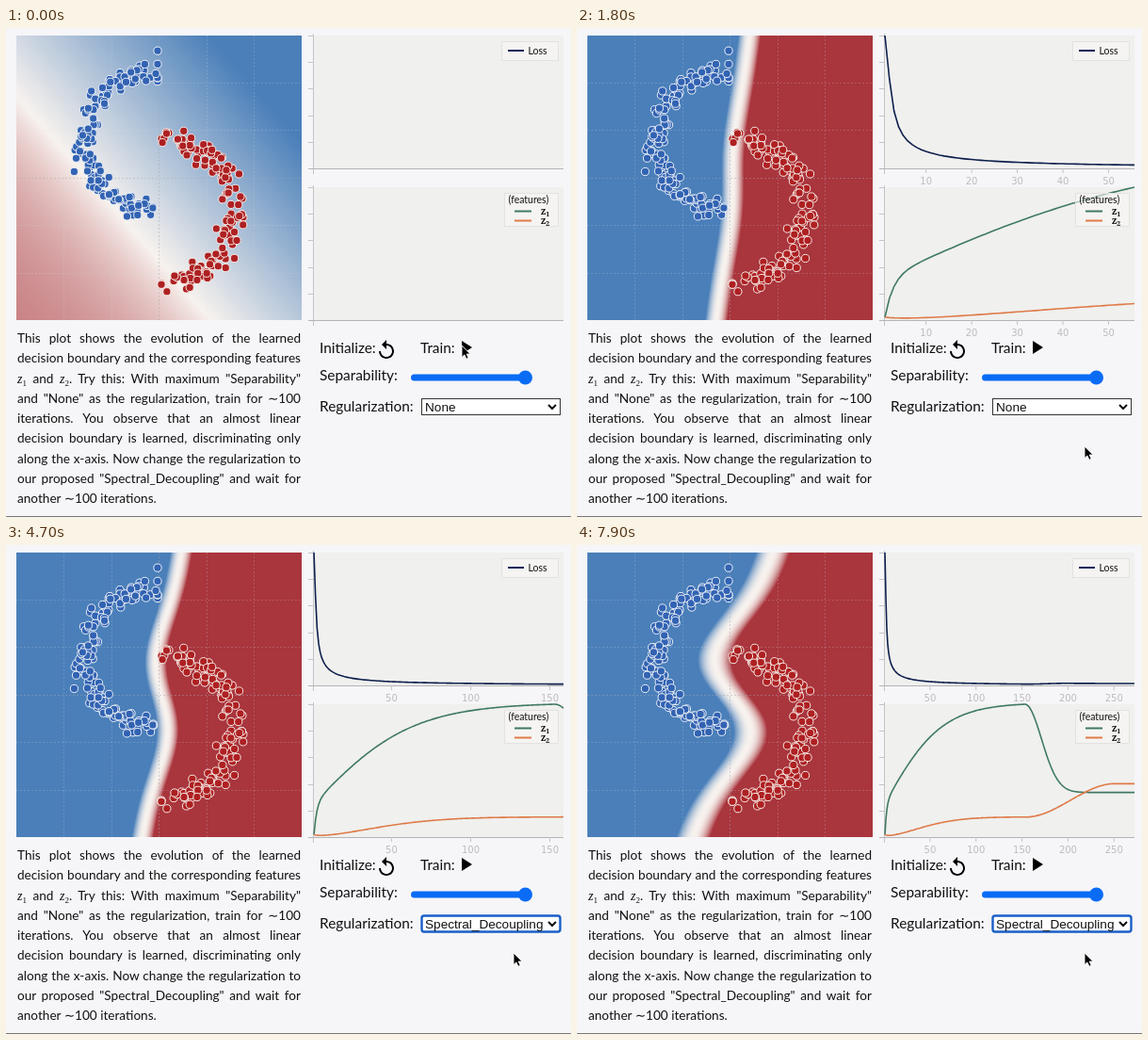
An HTML page with a canvas for the animation above (8 s loop, 600 by 519 pixels).

```html
<!DOCTYPE html>
<html lang="en">
<head>
<meta charset="utf-8">
<title>Decision boundary training</title>
<style>
  html, body { margin: 0; width: 100%; height: 100%; overflow: hidden; background: #f6f5f8; }
  #stage { position: absolute; left: 0; top: 0; width: 600px; height: 519px; overflow: hidden; color: #111; }
  canvas, svg { position: absolute; left: 0; top: 0; }
  #note { position: absolute; left: 12px; top: 319px; width: 301px; font: 13.6px/21.25px Lato, sans-serif; }
  #note div { height: 21.25px; white-space: nowrap; text-align: justify; text-align-last: justify; }
  #note div:last-child { text-align-last: left; }
  i { font: italic 14px/1 "Liberation Serif", serif; }
  sub { font: 9px/1 "Liberation Serif", serif; vertical-align: -3px; }
  .label { font: 15.4px Lato, sans-serif; }
  .small { font: 10.5px Lato, sans-serif; }
  .feature { font: bold 10px "Noto Serif", serif; }
  .option { font: 13.6px "Liberation Sans", sans-serif; }
</style>
</head>
<body>
<div id="stage">
  <canvas id="plot" width="600" height="519"></canvas>
  <div id="note">
    <div>This plot shows the evolution of the learned</div>
    <div>decision boundary and the corresponding features</div>
    <div><i>z</i><sub>1</sub> and <i>z</i><sub>2</sub>. Try this: With maximum "Separability"</div>
    <div>and "None" as the regularization, train for ∼100</div>
    <div>iterations. You observe that an almost linear</div>
    <div>decision boundary is learned, discriminating only</div>
    <div>along the x-axis. Now change the regularization to</div>
    <div>our proposed "Spectral_Decoupling" and wait for</div>
    <div>another ∼100 iterations.</div>
  </div>
  <svg width="600" height="519" viewBox="0 0 600 519" fill="#111">
    <g fill="#f8f7f5" fill-opacity=".6" stroke="#e3e2e2">
      <rect x="526.5" y="14.5" width="60" height="20"/>
      <rect x="529.5" y="175.5" width="57" height="35"/>
    </g>
    <g fill="none" stroke-width="2">
      <path d="M533 24h17" stroke="#0d1f5a"/>
      <path d="M540 194.5h18" stroke="#3f7a60"/>
      <path d="M540 204.5h18" stroke="#df7a48"/>
    </g>
    <text class="small" x="554.5" y="28">Loss</text>
    <text class="small" x="533.5" y="186">(features)</text>
    <text class="feature" x="568" y="198">z<tspan font-size="7" dy="2">1</tspan></text>
    <text class="feature" x="568" y="208">z<tspan font-size="7" dy="2">2</tspan></text>

    <text class="label" x="333" y="345">Initialize:</text>
    <text class="label" x="440" y="345">Train:</text>
    <text class="label" x="333" y="374">Separability:</text>
    <text class="label" x="333" y="407">Regularization:</text>
    <path transform="translate(392 330)" fill="#000" d="M12 5V1L7 6l5 5V7c3.31 0 6 2.69 6 6s-2.69 6-6 6-6-2.69-6-6H4c0 4.42 3.58 8 8 8s8-3.58 8-8-3.58-8-8-8z"/>
    <path transform="translate(476 327)" fill="#000" d="M8 5v14l11-7z"/>

    <rect x="430" y="367.5" width="124" height="7" rx="3.5" fill="#0a6cf5"/>
    <circle cx="551.5" cy="371" r="7.5" fill="#0a6cf5"/>

    <rect id="box" x="441.5" y="393.5" width="147" height="17" fill="#fff" stroke="#333"/>
    <text id="choice" class="option" x="445" y="407"></text>
    <path d="M576 400l4 4 4-4" fill="none" stroke="#111" stroke-width="2"/>
    <path d="M0 518.5h600" stroke="#777"/>
    <path id="cursor" d="M0 0v12.5l2.9-2.6 2 4.4 2.3-1-2-4.3h4z" fill="#000" stroke="#fff" stroke-width=".9"/>
  </svg>
</div>
<script>
const LOOP = 8000, STEP = 100;
const TRAIN = 260, RATE = .0355;      // training start in ms, iterations per ms
const SWITCH = 4500, SWITCH_N = 153;  // regularization change in ms and iterations

const ctx = document.getElementById('plot').getContext('2d');
const box = document.getElementById('box');
const choice = document.getElementById('choice');
const cursor = document.getElementById('cursor');

const clamp = (v, lo, hi) => Math.min(hi, Math.max(lo, v));
const mix = (a, b, k) => a + (b - a) * k;
const ramp = (v, from, to) => clamp((v - from) / (to - from), 0, 1);
const smooth = (v, from, to) => { const u = ramp(v, from, to); return u * u * (3 - 2 * u); };
const settle = (d, scale, power = 1) => 1 - Math.exp(-((Math.max(0, d) / scale) ** power));

// Learning curves by iteration
function loss(n) {
  const d = n - 1, warm = .1 + .9 * settle(d, 1.3) / 1;
  return 1 / (1 + .85 * d ** .95 * warm) + .008 * smooth(n, SWITCH_N, 200);
}
function z1(n) {
  const d = n - 1, rise = 2 + 33 * settle(d, 1.8) + 106 * Math.tanh(d / 62);
  return mix(rise, 46.5, settle(n - SWITCH_N, 25.5, 2));
}
function z2(n) {
  const d = n - 1;
  return .7 + 1.3 * Math.exp(-d / 3) + 20 * settle(d, 55, 1.7) + 35 * smooth(n, 155, 250);
}

// Boundary: a tilted line plus an S-shaped bend
function boundary(n) {
  const early = Math.exp(-Math.max(0, n - 26) / 25);
  const freed = settle(n - SWITCH_N, 28);
  const tilt = 16 + 6 * early + 28 * freed;
  const bend = 9 * settle(n - 26, 60) + 23 * freed;
  const width = 10 + 6 * early + 8 * freed;
  const edge = y => {
    const u = (y - 160) / 48;
    return 165 - tilt * (y - 159) / 151 + bend * u * Math.exp(.5 - u * u / 2);
  };
  return { edge, width };
}

// Untrained field: blue above a diagonal, red below
function untrained(x, y) {
  const d = 60 + 1.15 * x - y;
  return d > 0 ? Math.min(1, d / 300) : -.7 * settle(-d, 130);
}

const RED = [169, 53, 61], WHITE = [247, 242, 238], BLUE = [74, 127, 185];
const FX = 11, FY = 8, FW = 303, FH = 302;
const image = ctx.createImageData(FW, FH);

function drawField(n) {
  const { edge, width } = boundary(n);
  const trained = smooth(n, 1, 12);
  let p = 0;
  for (let y = FY; y < FY + FH; y++) {
    const bx = edge(y);
    for (let x = FX; x < FX + FW; x++) {
      const u = clamp((bx - x) / width, -1, 1);
      let v = u * Math.abs(u);
      if (trained < 1) v = mix(untrained(x, y), v, trained);
      const hue = v > 0 ? BLUE : RED, k = Math.abs(v);
      for (let c = 0; c < 3; c++) image.data[p++] = mix(WHITE[c], hue[c], k);
      image.data[p++] = 255;
    }
  }
  ctx.putImageData(image, FX, FY);
}

function line(x1, y1, x2, y2, color, dash = []) {
  ctx.setLineDash(dash);
  ctx.strokeStyle = color;
  ctx.lineWidth = 1;
  ctx.beginPath();
  ctx.moveTo(x1, y1);
  ctx.lineTo(x2, y2);
  ctx.stroke();
  ctx.setLineDash([]);
}

function drawGrid() {
  for (let i = -2; i <= 2; i++) {
    const color = i ? 'rgba(220,220,225,.22)' : 'rgba(165,165,170,.45)';
    const x = Math.round(162 + i * 50.5) + .5, y = Math.round(158.5 + i * 50.5) + .5;
    line(x, FY, x, FY + FH, color, [2, 2]);
    line(FX, y, FX + FW, y, color, [2, 2]);
  }
}

let seed = 11;
const rand = () => (seed = (seed * 16807) % 2147483647) / 2147483647;
const gauss = () => Math.sqrt(-2 * Math.log(rand())) * Math.cos(2 * Math.PI * rand());

// Noisy half ring opening away from the given side
function moon(side, cy, ry) {
  return Array.from({ length: 150 }, () => {
    const a = (rand() - .5) * Math.PI;
    const reach = Math.max(2, 80 * Math.cos(a) + 6 * gauss());
    return [163 + side * reach, cy + ry * Math.sin(a) + 6 * gauss()];
  });
}
const blueDots = moon(-1, 121, 74), redDots = moon(1, 194, 78);

function drawDots(dots, fill, ring) {
  ctx.fillStyle = fill;
  ctx.strokeStyle = ring;
  ctx.lineWidth = 1;
  for (const [x, y] of dots) {
    ctx.beginPath();
    ctx.arc(x, y, 4.1, 0, 2 * Math.PI);
    ctx.fill();
    ctx.stroke();
  }
}

const CX = 327, CW = 265, CH = 141;

function tickStep(span) {
  const raw = span / 4.8, base = 10 ** Math.floor(Math.log10(raw)), r = raw / base;
  return Math.max(1, base * (r >= 7.07 ? 10 : r >= 3.16 ? 5 : r >= 1.414 ? 2 : 1));
}

function drawAxes(top, n) {
  const base = top + CH;
  ctx.fillStyle = '#f0f0ee';
  ctx.fillRect(CX - 1, top, CW + 1, CH);
  line(CX - .5, top - 2, CX - .5, base + 6, '#c4c4c8');
  line(CX - 6, base + .5, CX + CW, base + .5, '#b4b4b6');
  for (let i = 0; i < 5; i++) {
    const y = Math.round(top + i * CH / 5) + .5;
    line(CX - 6, y, CX, y, '#c4c4c8');
  }
  if (n < 2) return;
  ctx.save();
  ctx.beginPath();
  ctx.rect(0, 0, CX + CW, 519);
  ctx.clip();
  ctx.fillStyle = '#bcbcc0';
  ctx.font = '10px "DejaVu Sans", sans-serif';
  ctx.textAlign = 'center';
  const step = tickStep(n - 1);
  for (let v = step; v <= n; v += step) {
    const x = CX + (v - 1) / (n - 1) * CW;
    line(x, base, x, base + 5, '#c4c4c8');
    ctx.fillText(v, x, base + 17);
  }
  ctx.restore();
}

function drawCurve(n, yAt, color) {
  if (n <= 1) return;
  ctx.strokeStyle = color;
  ctx.lineWidth = 1.6;
  ctx.lineJoin = 'round';
  ctx.beginPath();
  const add = i => ctx.lineTo(CX + (i - 1) / (n - 1) * CW, yAt(i));
  for (let i = 1; i < n; i++) add(i);
  add(n);
  ctx.stroke();
}

// Pointer rests at the play button, then near the bottom, visits the menu and returns
function pointer(t) {
  const away = ramp(t, 400, 1500);
  const visit = smooth(t, 3600, 4100) - smooth(t, SWITCH, 4700);
  return [mix(484, 539, away) - 18 * visit, mix(337, 444, away) - 11 * smooth(t, 3600, 4700) - 32 * visit];
}

function draw(t) {
  const n = 1 + Math.max(0, t - TRAIN) * RATE;
  ctx.clearRect(0, 0, 600, 519);
  drawField(n);
  drawGrid();
  drawDots(blueDots, '#3263b3', '#eef2f8');
  drawDots(redDots, '#ae2022', '#f7ebe6');
  drawAxes(8, n);
  drawAxes(169, n);
  drawCurve(n, i => 149 - 141 * loss(i), '#0d1f4c');
  const peak = z1(Math.min(n, SWITCH_N));
  drawCurve(n, i => 309.5 - z1(i) / peak * 140.5, '#3f7a60');
  drawCurve(n, i => 309.5 - z2(i) / peak * 140.5, '#df7a48');

  cursor.setAttribute('transform', `translate(${pointer(t)})`);
  const decoupled = t >= SWITCH;
  choice.textContent = decoupled ? 'Spectral_Decoupling' : 'None';
  box.setAttribute('stroke', decoupled ? '#1a5fc8' : '#333');
  box.setAttribute('stroke-width', decoupled ? 2.4 : 1);
  box.setAttribute('rx', decoupled ? 2.5 : 0);
}

const start = performance.now();
let shown = -1;
function tick() {
  const t = Math.floor(((performance.now() - start) % LOOP) / STEP) * STEP;
  if (t !== shown) draw(shown = t);
  requestAnimationFrame(tick);
}
tick();
</script>
</body>
</html>
```
